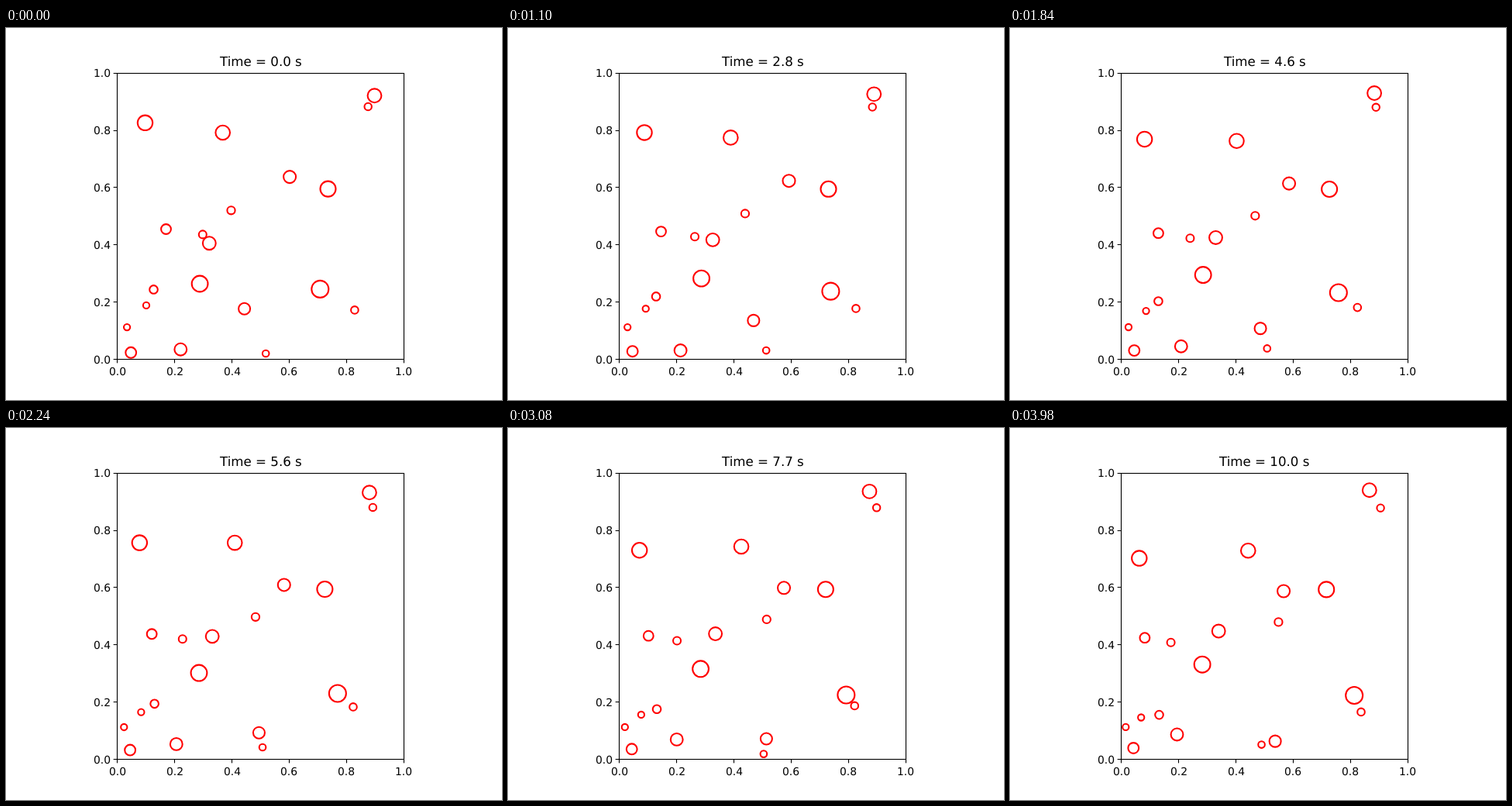
These frames come from a looping animation (640 px wide and 480 px high, 4 s). An HTML page with a canvas:

```html
<!DOCTYPE html>
<html lang="en">
<head>
<meta charset="utf-8">
<title>Bouncing discs</title>
<style>
html, body { margin: 0; width: 100%; height: 100%; overflow: hidden; background: #fff; }
canvas { display: block; }
</style>
</head>
<body>
<canvas id="stage" width="640" height="480"></canvas>
<script>
const ctx = document.getElementById('stage').getContext('2d');
const LOOP = 4000, STEP = 20, FRAMES = LOOP / STEP;
const LEFT = 143.2, TOP = 57.6, SIZE = 369.6;
const RIGHT = LEFT + SIZE, BOTTOM = TOP + SIZE;

const disc = (r, x, y, vx, vy) => ({ r, x, y, vx, vy });

// Starting state: radius, centre, velocity in pixels per second
const start = () => [
  disc(8.9, 475.5, 87.3, -2.94, -1.78),
  disc(4.7, 467.2, 101.5, 2.74, 0.43),
  disc(9.7, 179.5, 122.3, -3.19, 11.51),
  disc(9.3, 279.7, 135, 6.93, 5.85),
  disc(8, 366.1, 192.1, -3.27, 4.62),
  disc(10, 415.5, 207.6, -1.83, 0.2),
  disc(5.1, 290.5, 235.3, 14.05, 3.79),
  disc(6.4, 206.5, 259.5, -8.19, 2.81),
  disc(5, 253.8, 266.4, -11.61, 2.61),
  disc(8.4, 262.3, 277.7, 1.73, -3.94),
  disc(10.4, 250.1, 330, -0.5, -6.23),
  disc(5.3, 190.5, 337.4, 0.5, 8.22),
  disc(4.1, 181, 357.9, -2.96, 3.92),
  disc(4.1, 156.1, 386.1, -1.71, -0.05),
  disc(6.9, 161.2, 418.8, -0.48, -1.46),
  disc(7.9, 225.3, 414.7, -2.46, 7.15),
  disc(7.5, 307.6, 362.2, 8.41, 13.83),
  disc(4.3, 335.2, 420, -1.86, -3.56),
  disc(11, 405.3, 336.9, 10.08, 2.49),
  disc(4.8, 449.9, 363.9, -0.86, -1.78)
];

// Elastic collision, mass proportional to area
function collide(a, b) {
  const dx = b.x - a.x, dy = b.y - a.y, gap = Math.hypot(dx, dy);
  if (gap > a.r + b.r) return;
  const nx = dx / gap, ny = dy / gap;
  const closing = (a.vx - b.vx) * nx + (a.vy - b.vy) * ny;
  if (closing <= 0) return;
  const ma = a.r ** 2, mb = b.r ** 2, push = 2 * closing / (ma + mb);
  a.vx -= push * mb * nx;
  a.vy -= push * mb * ny;
  b.vx += push * ma * nx;
  b.vy += push * ma * ny;
}

function advance(discs, dt) {
  for (const d of discs) {
    d.x += d.vx * dt;
    d.y += d.vy * dt;
    if (d.x < LEFT + d.r) d.vx = Math.abs(d.vx);
    if (d.x > RIGHT - d.r) d.vx = -Math.abs(d.vx);
    if (d.y < TOP + d.r) d.vy = Math.abs(d.vy);
    if (d.y > BOTTOM - d.r) d.vy = -Math.abs(d.vy);
  }
  discs.forEach((a, i) => discs.slice(i + 1).forEach(b => collide(a, b)));
}

function simulate() {
  const discs = start(), frames = [];
  for (let i = 0; i < FRAMES; i++) {
    frames.push(discs.map(d => ({ ...d })));
    for (let ms = 0; ms < STEP; ms++) advance(discs, 0.001);
  }
  return frames;
}

const frames = simulate();
const snap = v => Math.round(v) + 0.5;

function line(x0, y0, x1, y1) {
  ctx.beginPath();
  ctx.moveTo(x0, y0);
  ctx.lineTo(x1, y1);
  ctx.stroke();
}

// align: 0.5 centres the text on x, 1 ends it there; side bearings are left out
function label(text, x, y, size, align) {
  ctx.font = size + 'px "DejaVu Sans", sans-serif';
  ctx.textRendering = 'geometricPrecision';
  const width = ctx.measureText(text).width - 1.1;
  ctx.fillText(text, Math.round(x - width * align), Math.round(y));
}

function drawDiscs(discs) {
  ctx.save();
  ctx.beginPath();
  ctx.rect(LEFT, TOP, SIZE, SIZE);
  ctx.clip();
  ctx.strokeStyle = '#f00';
  ctx.lineWidth = 2.08;
  for (const { r, x, y } of discs) {
    ctx.beginPath();
    ctx.arc(x, y, r, 0, Math.PI * 2);
    ctx.stroke();
  }
  ctx.restore();
}

function drawAxes() {
  ctx.strokeStyle = ctx.fillStyle = '#000';
  ctx.lineWidth = 1.11;
  const l = snap(LEFT), t = snap(TOP), b = snap(BOTTOM);
  ctx.strokeRect(l, t, snap(RIGHT) - l, b - t);
  for (let k = 0; k <= 5; k++) {
    const x = LEFT + SIZE * k / 5, y = BOTTOM - SIZE * k / 5;
    const text = (k / 5).toFixed(1);
    line(snap(x), b, snap(x), b + 4.86);
    line(l - 4.86, snap(y), l, snap(y));
    label(text, x, 448, 13.89, 0.5);
    label(text, LEFT - 9.72, y + 5.6, 13.89, 1);
  }
}

function draw(now) {
  const i = Math.floor((now % LOOP) / STEP);
  ctx.fillStyle = '#fff';
  ctx.fillRect(0, 0, 640, 480);
  drawDiscs(frames[i]);
  drawAxes();
  const seconds = Math.floor((i + 1) / 2) / 10;
  label(`Time = ${seconds.toFixed(1)} s`, LEFT + SIZE / 2, 49, 16.67, 0.5);
}

let begin;
function tick(now) {
  begin ??= now;
  draw(Math.max(0, now - begin));
  requestAnimationFrame(tick);
}
draw(0);
requestAnimationFrame(tick);
</script>
</body>
</html>
```
